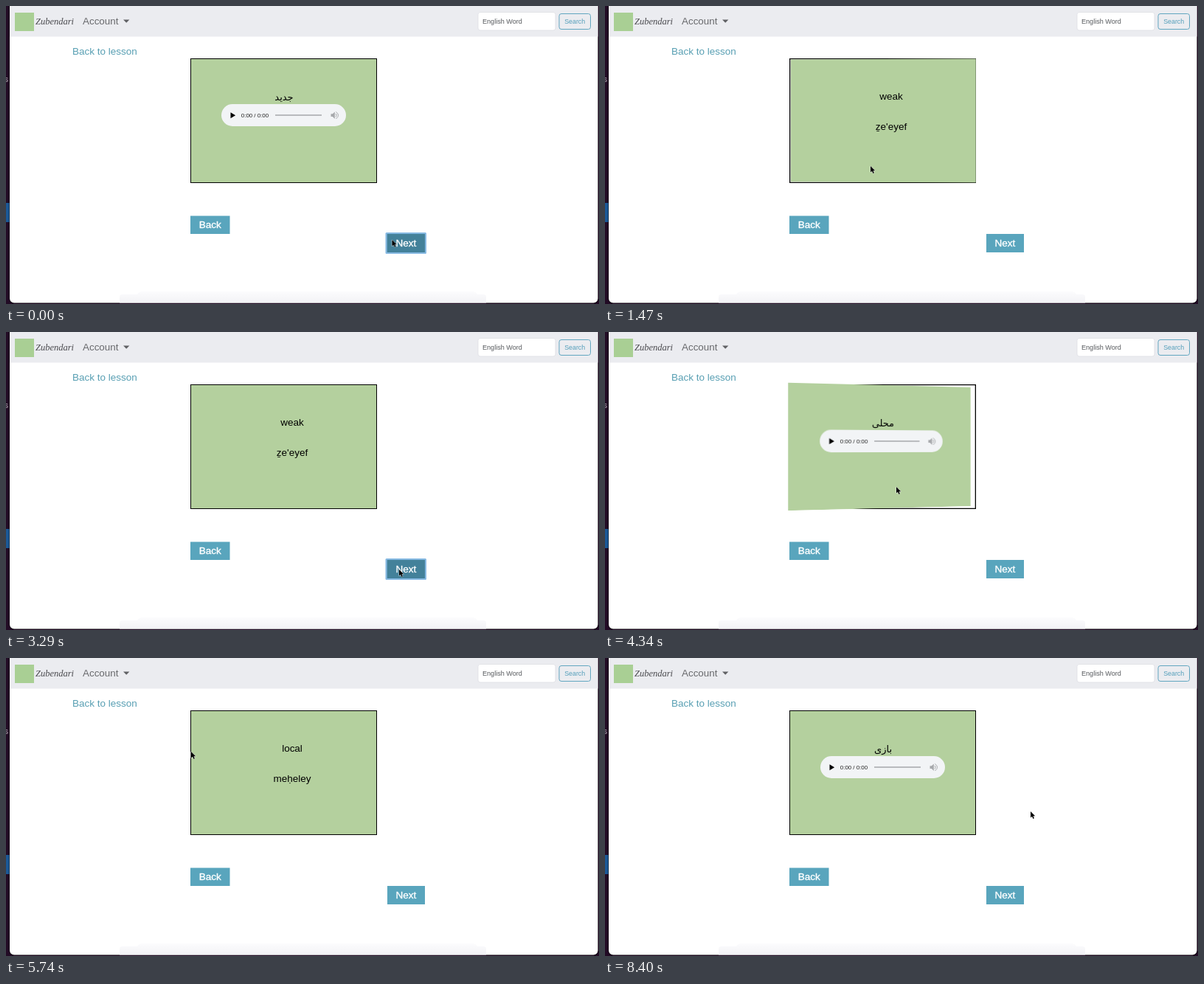
Write an HTML page that moves like this. It is 804 px wide and 404 px high and loops after 8470 ms.

```html
<!DOCTYPE html>
<html lang="en">
<head>
<meta charset="utf-8">
<title>Flash cards</title>
<style>
  html, body { margin: 0; width: 100%; height: 100%; overflow: hidden; background: #1d0b20; }
  #stage { position: relative; width: 804px; height: 404px; overflow: hidden; }
  svg { display: block; font-family: "Liberation Sans", Arial, sans-serif; font-size: 13.5px; }
  .layer, .face { position: absolute; inset: 0; }
  .mid { text-anchor: middle; }
  .fa { font: 13px "DejaVu Sans", sans-serif; text-anchor: middle; }

  .card {
    position: absolute; left: 250px; top: 71px; width: 253px; height: 169px;
    box-sizing: border-box; border: 1px solid #000; box-shadow: inset 0 0 0 .3px #000;
    perspective: 600px;
  }
  .inner { position: absolute; inset: 0; transform-style: preserve-3d; animation: flip 8.47s ease infinite; }
  .face { background: #b4d09e; backface-visibility: hidden; }
  .back { transform: rotateY(180deg); }

  .word { visibility: hidden; animation: 8.47s step-end infinite; }
  .new { animation-name: new; }
  .weak { animation-name: weak; }
  .local { animation-name: local; }
  .game { animation-name: game; }
  .focus { animation: focus 8.47s step-end infinite; }
  .cursor { position: absolute; left: 0; top: 0; overflow: visible; animation: move 8.47s ease-in-out infinite; }

  @keyframes flip {
    0%, 9.233% { transform: rotateY(0deg); }
    18.678%, 39.669% { transform: rotateY(180deg); }
    49.115%, 50.579% { transform: rotateY(0deg); }
    60.024%, 77.686% { transform: rotateY(180deg); }
    87.131%, 100% { transform: rotateY(0deg); }
  }
  @keyframes new { 0% { visibility: visible; } 1.653%, 100% { visibility: hidden; } }
  @keyframes weak { 0% { visibility: hidden; } 1.653% { visibility: visible; } 39.669%, 100% { visibility: hidden; } }
  @keyframes local { 0% { visibility: hidden; } 39.669% { visibility: visible; } 77.686%, 100% { visibility: hidden; } }
  @keyframes game { 0% { visibility: hidden; } 77.686%, 100% { visibility: visible; } }
  @keyframes focus {
    0%, 37.19%, 76.27% { opacity: 1; }
    9.233%, 50.579%, 90.3%, 100% { opacity: 0; }
  }
  @keyframes move {
    0%, 1.65% { transform: translate(523.5px, 317px); }
    8.26%, 27.2% { transform: translate(360px, 217px); }
    36.6%, 40.5% { transform: translate(533px, 322px); }
    49%, 61.4% { transform: translate(395px, 210px); }
    67.77%, 69.7% { transform: translate(251px, 127px); }
    76.2%, 79.1% { transform: translate(533px, 320px); }
    89.7%, 100% { transform: translate(577px, 208px); }
  }
</style>
</head>
<body>
<div id="stage">
  <svg class="layer" width="804" height="404">
    <defs>
      <linearGradient id="dock" x2="0" y2="1">
        <stop stop-color="#fcfcfd"/><stop offset="1" stop-color="#f2f2f5"/>
      </linearGradient>
      <clipPath id="win"><rect x="5" y="-10" width="797.5" height="412.5" rx="6"/></clipPath>
    </defs>

    <!-- desktop behind the window -->
    <rect width="804" height="404" fill="#220b25"/>
    <rect y="267" width="5" height="26" fill="#1b5896"/>
    <text x="-2" y="103" font-size="10" fill="#b9b3ba">s</text>
    <rect x="4.5" y="-10" width="798.5" height="413" rx="6" fill="#000"/>

    <g clip-path="url(#win)">
      <rect width="804" height="404" fill="#fff"/>
      <rect width="804" height="41.5" fill="#ebecf0"/>
      <path d="M154 403V394q0-3 4-3h20q2-4 8-4h446q5 0 7 4h8q4 0 4 3v9z" fill="url(#dock)"/>
    </g>

    <!-- navigation -->
    <rect x="12" y="9" width="26" height="25" fill="#a9cf94"/>
    <text x="40" y="25" font-family="'Liberation Serif', serif" font-style="italic" font-size="12.5" fill="#4a4a4e">Zubendari</text>
    <text x="104" y="25" font-size="13.4" fill="#68696c">Account</text>
    <path d="M159 18.5h8.4l-4.2 4.2z" fill="#606164"/>
    <rect x="640" y="8.5" width="105" height="24.5" rx="3" fill="#fff" stroke="#dddfe4" stroke-width=".8"/>
    <text x="646" y="23.7" font-size="9.1" fill="#55585c">English Word</text>
    <rect x="750" y="10.5" width="42.5" height="21" rx="3" fill="none" stroke="#62a6c0"/>
    <text class="mid" x="771.2" y="24" font-size="8.9" fill="#559fbb">Search</text>

    <text x="90" y="65.7" fill="#589fb3">Back to lesson</text>

    <!-- buttons -->
    <rect x="250" y="284.5" width="53.5" height="24.5" fill="#59a5bd"/>
    <rect x="517" y="309" width="51" height="25" fill="#59a5bd"/>
    <g class="focus">
      <rect x="514.5" y="307" width="55.5" height="29" rx="1.5" fill="#86b9e2"/>
      <rect x="516.7" y="309" width="51.3" height="25" fill="#43819a"/>
    </g>
    <g class="mid" fill="#fff" stroke="#fff" stroke-width=".35">
      <text x="276.8" y="301.4">Back</text>
      <text x="542.3" y="326.2">Next</text>
    </g>
  </svg>

  <div class="card">
    <div class="inner">
      <div class="face">
        <svg width="251" height="167" viewBox="251 72 251 167">
          <g direction="rtl">
            <text class="fa word new" x="377" y="128">جدید</text>
            <text class="fa word weak" x="377" y="128">ضعیف</text>
            <text class="fa word local" x="377" y="128">محلی</text>
            <text class="fa word game" x="377" y="128">بازی</text>
          </g>
          <rect x="292" y="133" width="169" height="30" rx="15" fill="#f2f4f6"/>
          <path d="M304.5 144.3v8l6.6-4z"/>
          <text x="318.8" y="151" font-size="7.9" fill="#222">0:00 / 0:00</text>
          <path d="M365 148h63" stroke="#b8babd" stroke-width="1.8"/>
          <path d="M440.5 146.3h2.3l3-2.8v9.4l-3-2.8h-2.3z" fill="#a7a9ac"/>
          <path d="M447.2 145.9q1.7 2.3 0 4.6M447.4 143.4q6.2 4.8 0 9.6" fill="none" stroke="#a7a9ac"/>
        </svg>
      </div>
      <div class="face back">
        <svg class="mid" width="251" height="167" viewBox="251 72 251 167">
          <g class="word weak"><text x="388" y="127.3">weak</text><text x="388" y="168">ẕe'eyef</text></g>
          <g class="word local"><text x="388" y="127.3">local</text><text x="388" y="168">meḥeley</text></g>
          <g class="word game"><text x="388" y="127.3">game</text><text x="388" y="168">bazey</text></g>
        </svg>
      </div>
    </div>
  </div>

  <svg class="cursor" width="8" height="12">
    <path d="M0 0v8.6l2-1.8 1.4 3.1 1.5-.7-1.4-3h2.7z" stroke="#fff" stroke-width=".8" paint-order="stroke"/>
  </svg>
</div>
</body>
</html>
```
